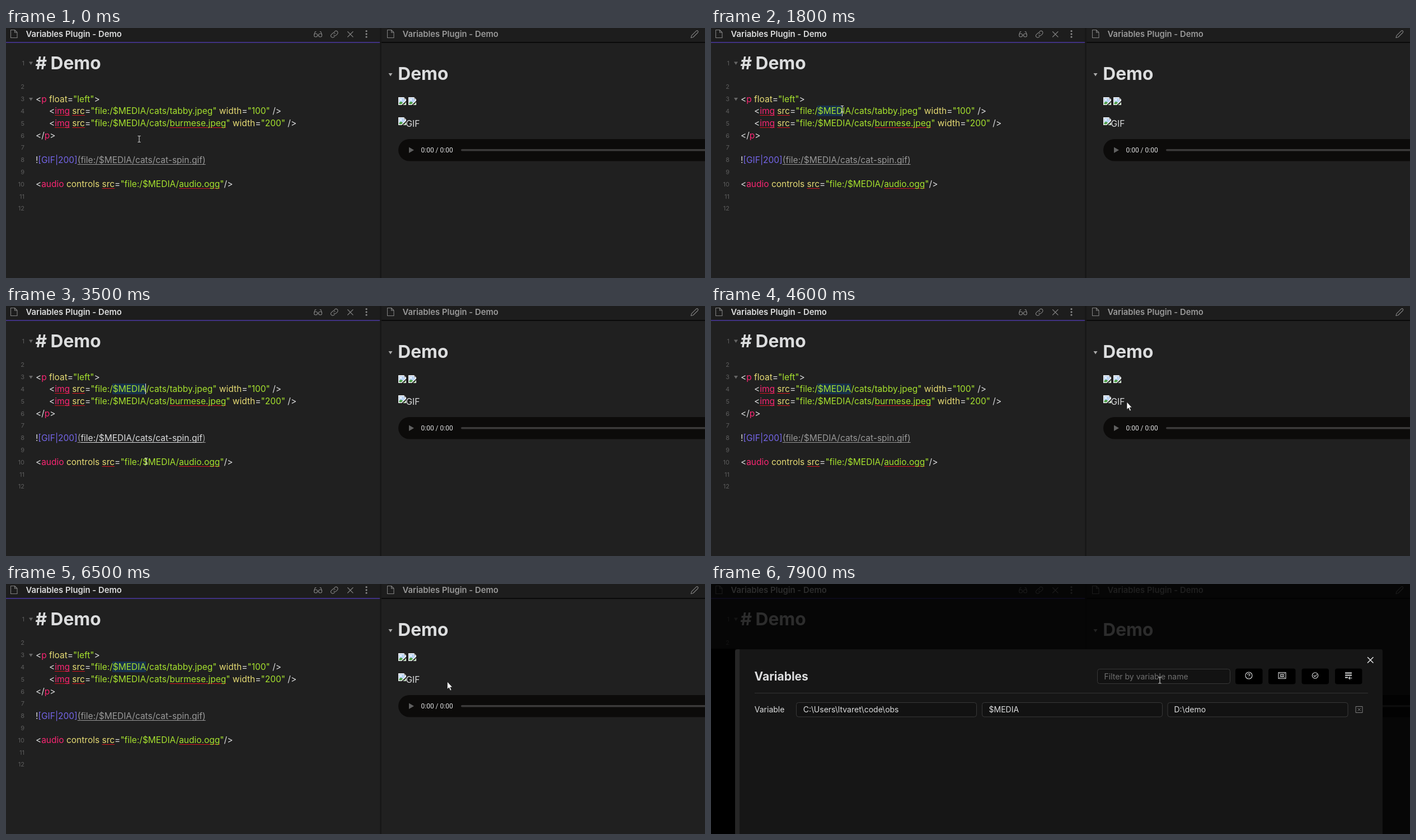
An HTML page that plays this animation: 1249 by 448 pixels, repeating every 8000 ms.

```html
<!DOCTYPE html>
<html lang="en">
<head>
<meta charset="utf-8">
<title>Variables Plugin - Demo</title>
<style>
  html, body { margin: 0; width: 100%; height: 100%; overflow: hidden; background: #202020; }
  svg { display: block; }
  text, .code { font-family: Inter, sans-serif; white-space: pre; }
  text { fill: #dcddde; font-size: 14px; }
  .title { font-size: 14.8px; font-weight: 600; }
  .muted { fill: #999; }
  .h1 { font-size: 31.7px; font-weight: 700; }
  .num { font-size: 11px; fill: #5c5c5c; text-anchor: end; }
  .time { font: 12px Roboto, sans-serif; }
  .icon { fill: none; stroke: #808080; stroke-width: 1.1; stroke-linecap: round; stroke-linejoin: round; }
  .light { stroke: #dcddde; }
  .field { fill: #121212; stroke: #383838; }

  .code { font-size: 15.5px; line-height: 21.8px; color: #dcddde; }
  .code div { height: 21.8px; }
  .tab { display: inline-block; width: 24px; }
  .tag { color: #f92672; }
  .attr { color: #e6db74; }
  .str { color: #a6e22e; }
  .link { color: #7465e8; }
  .url { color: #999; text-decoration: underline 1px; text-underline-offset: 2px; text-decoration-skip-ink: none; }
  .hover .path { color: #dcddde; }
  .typo { text-decoration: underline 1px #d3121e; text-underline-offset: 2px; text-decoration-skip-ink: none; }
</style>
</head>
<body>
<svg width="1249" height="448" viewBox="0 0 1249 448">
  <defs>
    <path id="file" class="icon" d="M1.5 .5H7.5L12 5V14.5H.5V.5H7.5V5H12"/>
    <path id="fold" d="M-3.5 -2.5H3.5L0 3Z"/>
    <g id="broken">
      <path fill="#f4f4f4" d="M0 0H10L14 4V14H0Z"/>
      <path fill="#b9d3f4" d="M1.5 1.5H9.5V4.5H12.5V6L5 12.5H1.5Z"/>
      <path fill="#4c9e45" d="M1.5 12.5V10.5Q4.5 6 8 10L5.5 12.5Z"/>
      <circle cx="4.5" cy="4.5" r="1.5" fill="#fff"/>
      <path fill="#202020" d="M14 6.5V9L8.5 14H6Z"/>
      <path fill="#4c9e45" d="M9.5 13L12.5 10.5V13Z"/>
      <path fill="#aaa" d="M10 0L14 4H10Z"/>
    </g>
  </defs>

  <rect width="1249" height="448" fill="#202020"/>
  <rect width="1249" height="25" fill="#1d1d1d"/>

  <!-- Editor pane -->
  <rect y="25" width="668" height="1.6" fill="#483699"/>
  <use href="#file" x="8" y="3"/>
  <text class="title" x="35.5" y="15.5">Variables Plugin - Demo</text>
  <g class="icon">
    <circle cx="553.5" cy="13" r="3"/><circle cx="561.5" cy="13" r="3"/>
    <path d="M556.5 13H558.5M550.5 12L552.5 6.5H554M564.5 12L562.5 6.5H561"/>
    <path d="M585.5 12.5A3.2 3.2 0 0 0 590 12.8L592 10.8A3.2 3.2 0 0 0 587.5 6.2L586.3 7.4M588 10A3.2 3.2 0 0 0 583.5 9.6L581.5 11.6A3.2 3.2 0 0 0 586 16.2L587.2 15"/>
    <path d="M610.5 6.5L620 16M620 6.5L610.5 16"/>
  </g>
  <g fill="#8c8c8c">
    <circle cx="644" cy="5.5" r="1.6"/><circle cx="644" cy="10.8" r="1.6"/><circle cx="644" cy="16" r="1.6"/>
  </g>
  <g id="numbers"></g>
  <g fill="#666"><use href="#fold" x="44.5" y="63"/><use href="#fold" x="44.5" y="127.5"/></g>
  <text class="h1" x="52.5" y="74.3">#</text>
  <text class="h1" x="79.6" y="74.3">Demo</text>
  <rect id="selection" x="190" y="139" height="19" fill="#17304d"/>
  <foreignObject x="52.9" y="116.6" width="610" height="230">
    <div class="code" id="code"><div>&lt;<span class="tag">p</span> <span class="attr">float</span>=<span class="str">"left"</span>&gt;</div><div><i class="tab"></i>&lt;<span class="tag typo">img</span> <span class="attr typo">src</span>=<span class="str">"file:/$MEDIA/cats/tabby.jpeg"</span> <span class="attr">width</span>=<span class="str">"100"</span> /&gt;</div><div><i class="tab"></i>&lt;<span class="tag typo">img</span> <span class="attr typo">src</span>=<span class="str">"file:/$MEDIA/cats/<span class="typo">burmese.jpeg</span>"</span> <span class="attr">width</span>=<span class="str">"200"</span> /&gt;</div><div>&lt;/<span class="tag">p</span>&gt;</div><div></div><div>!<span class="link">[GIF|200]</span><span class="url">(</span><span class="url path">file:/$MEDIA/cats/cat-spin.gif</span><span class="url">)</span></div><div></div><div>&lt;<span class="tag">audio</span> <span class="attr">controls</span> <span class="attr typo">src</span>=<span class="str">"file:/$MEDIA/<span class="typo">audio.ogg</span>"</span>/&gt;</div></div>
  </foreignObject>
  <rect id="caret" y="139" width="1" height="19" fill="#e8e8e8"/>

  <!-- Preview pane -->
  <rect x="668" width="3" height="448" fill="#181818"/>
  <rect x="671" y="25" width="578" height="1.6" fill="#050505"/>
  <use href="#file" x="681" y="3"/>
  <text class="title muted" x="708.5" y="15.5">Variables Plugin - Demo</text>
  <path class="icon" d="M1224 17.5L1225 13.7L1233.5 5.2Q1235 4 1236.3 5.3Q1237.5 6.7 1236.3 8L1227.8 16.5Z"/>
  <use href="#fold" x="687" y="83.5" fill="#aaa"/>
  <text class="h1" x="700.3" y="92.5">Demo</text>
  <use href="#broken" x="701" y="124"/>
  <use href="#broken" x="719" y="124"/>
  <use href="#broken" x="701" y="160"/>
  <text x="714.5" y="176.7" style="font-size:15.5px">GIF</text>
  <rect x="701" y="199" width="600" height="39.5" rx="19.75" fill="#0c0b0a"/>
  <path d="M720 213.5L729 218.7L720 224Z" fill="#606060"/>
  <text class="time" x="741.5" y="223">0:00 / 0:00</text>
  <rect x="813" y="217" width="450" height="3.6" rx="1.8" fill="#3b3a3a"/>

  <!-- Settings dialog -->
  <g id="dialog">
    <rect width="1249" height="448" opacity=".8"/>
    <rect y="116" width="43" height="332"/>
    <path d="M43 448V121Q43 117 47 117H60V448Z" fill="#262626"/>
    <path d="M51 448V117H1197Q1200 117 1200 120V448Z" fill="#161616"/>
    <path class="icon light" style="stroke-width:1.6" d="M1173.5 131.5L1183 141M1183 131.5L1173.5 141"/>
    <text x="77.5" y="173" style="font-size:21px;font-weight:700">Variables</text>
    <rect class="field" x="690.5" y="152.5" width="237" height="26" rx="4"/>
    <text x="702.5" y="171" style="fill:#707070">Filter by variable name</text>
    <g id="buttons"></g>
    <g class="icon light">
      <circle cx="961" cy="164" r="6"/>
      <path d="M959 162.5Q959 160.7 961 160.7T963 162.4Q963 163.5 961 164.6M961 167.2V167.3"/>
      <path d="M1014 158.5H1027V169.5H1014ZM1016 160.5H1017M1024 160.5H1025M1016 167.5H1017M1024 167.5H1025"/>
      <circle cx="1020.5" cy="164" r="3"/><path d="M1020.5 162.5V165.5"/>
      <circle cx="1079.5" cy="164" r="5.2"/>
      <path d="M1077 164L1079 166L1082.3 162.3"/>
      <path style="stroke-width:2;stroke-linecap:butt" d="M1133 159.5H1145M1133 163.5H1145M1133 167.5H1138"/>
      <path d="M1139.5 168.5H1145M1141.8 166.2L1139.5 168.5L1141.8 170.8"/>
    </g>
    <rect x="78" y="195" width="1096" height="1" fill="#333"/>
    <text x="77.8" y="230">Variable</text>
    <rect class="field" x="152.5" y="212.5" width="322" height="25.5" rx="4"/>
    <rect class="field" x="484.5" y="212.5" width="322" height="25.5" rx="4"/>
    <rect class="field" x="816" y="212.5" width="322" height="25.5" rx="4"/>
    <text x="164.8" y="230">C:\Users\ltvaret\code\obs</text>
    <text x="496.5" y="230">$MEDIA</text>
    <text x="827.5" y="230">D:\demo</text>
    <path class="icon" style="stroke-width:1" d="M1152.5 219.5H1164V230.5H1152.5ZM1156 222.7L1160.5 227.3M1160.5 222.7L1156 227.3"/>
  </g>

  <path id="beam" d="M-2.5 -5.5H-.5L0 -5L.5 -5.5H2.5M0 -5V5M-2.5 5.5H-.5L0 5L.5 5.5H2.5" fill="none" stroke="#e4e4e4"/>
  <path id="arrow" d="M0 0V13.5L3.1 10.7L5.3 15.9L7.5 15L5.3 9.9H9.3Z" fill="#fff" stroke="#111" stroke-width=".7"/>
</svg>
<script>
  const LOOP = 8000, STEP = 100, DIALOG_AT = 6800;
  const $ = id => document.getElementById(id);
  const show = (el, on) => el.setAttribute('visibility', on ? 'visible' : 'hidden');

  // Pointer path: time, x, y
  const path = [
    [100, 238, 199], [400, 226, 180], [800, 207, 153], [900, 207, 153],
    [1200, 192, 147], [1400, 192, 147], [1800, 234.5, 145], [2200, 250.5, 142],
    [2500, 250.5, 142], [2700, 220, 176], [3200, 220, 176], [3400, 238, 236],
    [3500, 250.5, 278], [3700, 345, 262], [4100, 575, 202], [4600, 743, 172],
    [5000, 821, 114], [5200, 847, 150], [5400, 826, 206], [5600, 795, 197],
    [5900, 788.5, 175], [6700, 788.5, 175], [6800, 790, 177], [7600, 790, 177],
    [7700, 791, 177], [7800, 791, 177], [7900, 802, 172.5]
  ];
  const letterEdges = [190, 200, 214, 224, 235, 239, 250];

  function pointerAt(t) {
    const i = path.findIndex(p => p[0] >= t);
    if (i <= 0) return path[i < 0 ? path.length - 1 : 0].slice(1);
    const [a, b] = [path[i - 1], path[i]];
    const k = (t - a[0]) / (b[0] - a[0]);
    return [1, 2].map(n => a[n] + (b[n] - a[n]) * k);
  }

  function selectionEnd(t, x) {
    if (t < 1500) return letterEdges[0];
    if (t >= 2200) return letterEdges.at(-1);
    return letterEdges.reduce((a, b) => Math.abs(b - x) < Math.abs(a - x) ? b : a);
  }

  function draw(t) {
    const [x, y] = pointerAt(t);
    const dialog = t >= DIALOG_AT;
    const isBeam = dialog || x < 668;
    const end = selectionEnd(t, x);
    const blinkOn = t < 2300 || Math.floor((t - 2300) / 600) % 2 === 0;

    $('selection').setAttribute('width', end - letterEdges[0]);
    $('caret').setAttribute('x', end - 1);
    show($('caret'), t >= 1500 && blinkOn && !dialog);
    $('code').classList.toggle('hover', t >= 3400 && t < 3600);
    show($('dialog'), dialog);
    $('code').style.visibility = dialog ? 'hidden' : 'visible';
    show($('beam'), isBeam);
    show($('arrow'), !isBeam);
    $(isBeam ? 'beam' : 'arrow').setAttribute('transform', `translate(${x} ${y})`);
  }

  $('numbers').innerHTML = Array.from({ length: 12 }, (_, i) => {
    const y = i === 0 ? 67 : 109.3 + (i - 1) * 21.8;
    return `<text class="num" x="33" y="${y}">${i + 1}</text>`;
  }).join('');
  $('buttons').innerHTML = [937, 996, 1055.5, 1115].map(x =>
    `<rect x="${x}" y="151.5" width="48.5" height="28" rx="4"/>`).join('');

  const start = performance.now();
  function tick() {
    const t = (performance.now() - start) % LOOP;
    draw(Math.floor(t / STEP) * STEP);
    requestAnimationFrame(tick);
  }
  tick();
</script>
</body>
</html>
```
